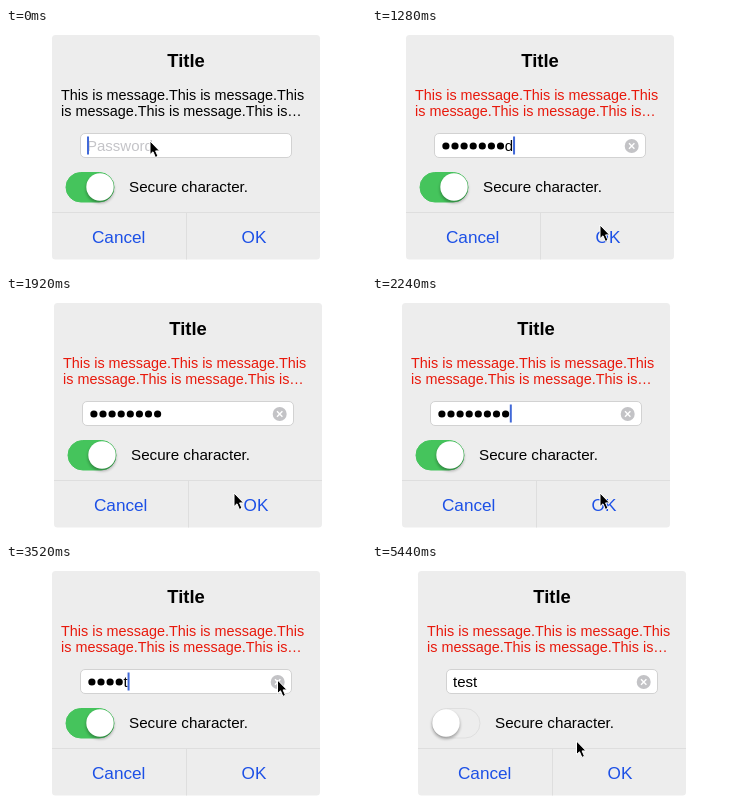
An HTML page that plays this animation: 360 px wide and 240 px high, repeating every 5760 ms.

```html
<!DOCTYPE html>
<html lang="en">
<head>
<meta charset="utf-8">
<title>Password alert</title>
<style>
  html, body { margin: 0; width: 100%; height: 100%; overflow: hidden; background: #fff; }
  svg { display: block; width: 360px; height: 240px; }
  text { font-family: "Liberation Sans", Arial, Helvetica, sans-serif; white-space: pre; }
  .title { font-size: 18.4px; font-weight: bold; text-anchor: middle; }
  .message { font-size: 14.4px; }
  .field { font-size: 15px; }
  .label { font-size: 15.2px; }
  .button { font-size: 17.2px; fill: #1c50e6; text-anchor: middle; }
</style>
</head>
<body>
<svg viewBox="0 0 360 240" xmlns="http://www.w3.org/2000/svg">
  <defs>
    <filter id="soft" x="-40%" y="-40%" width="180%" height="180%">
      <feGaussianBlur stdDeviation="1.5"/>
    </filter>
  </defs>
  <g id="dialog">
    <rect x="46" y="7" width="268" height="224.5" rx="3.5" fill="#ededed"/>
    <path d="M46 184.5H314M180.5 184.5V231.5" stroke="#dedede" fill="none"/>
    <text class="title" x="180" y="39">Title</text>
    <g id="message" class="message">
      <text x="55" y="72">This is message.This is message.This</text>
      <text x="55" y="88">is message.This is message.This is…</text>
    </g>

    <rect x="74.5" y="105.5" width="211" height="24" rx="4.5" fill="#fff" stroke="#d2d2d2"/>
    <text id="hint" class="field" x="81" y="123" fill="#c4c4c8">Password</text>
    <g id="dots"></g>
    <text id="plain" class="field" y="123"></text>
    <rect id="caret" y="108.5" width="2" height="18" fill="#4169d8"/>
    <g id="clear">
      <circle cx="271.7" cy="118" r="7" fill="#c3c3c6"/>
      <path d="M269 115.3l5.4 5.4m0-5.4l-5.4 5.4" stroke="#fff" stroke-width="1.4"/>
    </g>

    <rect id="track" x="60" y="144.5" width="48" height="29.5" rx="14.75"/>
    <circle id="shade" cy="161" r="14" fill="#000" opacity=".3" filter="url(#soft)"/>
    <circle id="knob" cy="159" r="13.7" fill="#fff"/>
    <text class="label" x="123" y="164">Secure character.</text>
    <text class="button" x="112.7" y="214.5">Cancel</text>
    <text class="button" x="248" y="214.5">OK</text>
  </g>
  <path id="pointer" d="M0 0V13.6L3 10.8L5.4 16.4L8 15.3L5.6 9.9H9.6Z" fill="#000" stroke="#fff" stroke-width="1" stroke-linejoin="round"/>
</svg>
<script>
const STEP = 320, LEFT = 81, DOT = 9.1;
const $ = id => document.getElementById(id);
const OK = [228, 197], CLEAR = [271.5, 116], SWITCH = [96, 158];

// Each step lists only what differs from the one before.
// peek: the last character is readable; caret: true, false or a fixed x
const changes = [
  { text: '', peek: true, secure: true, caret: true, red: false, shift: 0, at: [144, 113], sw: 'on' },
  { text: 'pas' },
  { text: 'passwo' },
  { text: 'password' },
  { red: true, shift: -12, at: OK },
  { shift: 15, caret: false },
  { shift: 2, peek: false },
  { shift: -16, caret: true },
  { shift: 0 },
  { text: '', at: CLEAR },
  { text: 'te', peek: true },
  { text: 'testt' },
  { at: [244, 212] },
  { peek: false },
  { at: SWITCH },
  { secure: false, caret: 127, sw: 'mid' },
  { caret: true, sw: 'off' },
  { text: 'test', caret: false, at: [204.5, 177] }
];
let last = {};
const steps = changes.map(c => last = { ...last, ...c });

const switches = {
  on: { x: 94, fill: '#45c45c', edge: '#45c45c' },
  mid: { x: 86.5, fill: '#9fd6aa', edge: '#94cfa0' },
  off: { x: 74, fill: '#ededed', edge: '#dfdfdf' }
};

function set(el, attrs) {
  for (const k in attrs) el.setAttribute(k, attrs[k]);
}

const dots = Array.from({ length: 8 }, (_, i) => {
  const dot = document.createElementNS('http://www.w3.org/2000/svg', 'circle');
  set(dot, { cx: LEFT + 4.9 + i * DOT, cy: 118, r: 3.6 });
  $('dots').append(dot);
  return dot;
});

function show(el, on) {
  el.style.display = on ? '' : 'none';
}

function draw(s) {
  const n = s.text.length;
  const hidden = s.secure ? Math.max(0, n - (s.peek ? 1 : 0)) : 0;
  const plain = $('plain');
  dots.forEach((d, i) => show(d, i < hidden));
  plain.textContent = s.text.slice(hidden);
  set(plain, { x: LEFT + hidden * DOT });
  show($('hint'), !n);
  show($('clear'), n);

  const end = LEFT + hidden * DOT + (hidden < n ? plain.getComputedTextLength() : 0);
  show($('caret'), s.caret);
  set($('caret'), { x: s.caret === true ? end : s.caret - 1 });

  const w = switches[s.sw];
  set($('track'), { fill: w.fill, stroke: w.edge });
  set($('knob'), { cx: w.x });
  set($('shade'), { cx: w.x });
  set($('message'), { fill: s.red ? '#e8190c' : '#000' });
  set($('dialog'), { transform: `translate(${s.shift} 0)` });
  set($('pointer'), { transform: `translate(${s.at})` });
}

let shown = -1;
function tick() {
  const i = Math.floor(performance.now() / STEP) % steps.length;
  if (i !== shown) draw(steps[shown = i]);
  requestAnimationFrame(tick);
}
tick();
</script>
</body>
</html>
```
